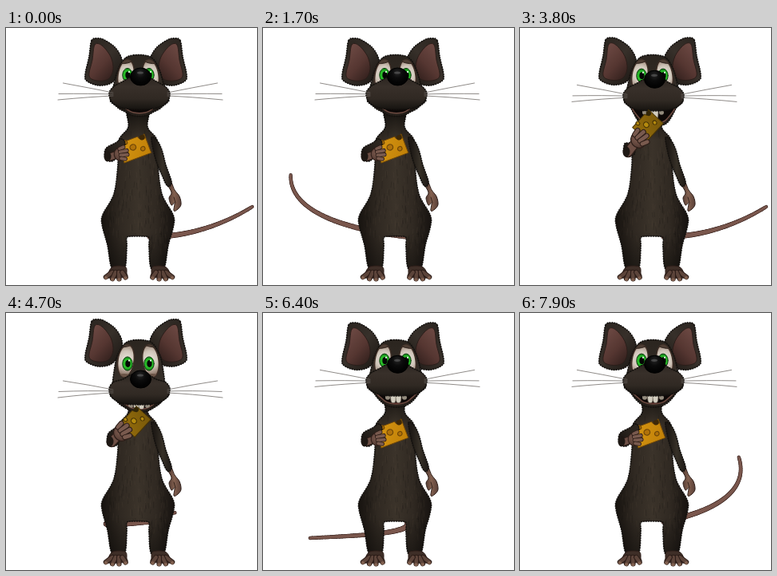
Animation of 314x322 px, one loop 8000 ms. Source, as an HTML page with a canvas:

```html
<!DOCTYPE html>
<html lang="en">
<head>
<meta charset="utf-8">
<title>Mouse with cheese</title>
<style>
html, body { margin: 0; width: 100%; height: 100%; overflow: hidden; background: #fff; }
canvas { display: block; width: 314px; height: 322px; }
</style>
</head>
<body>
<canvas id="stage" width="314" height="322"></canvas>
<script>
const ctx = document.getElementById('stage').getContext('2d');
const LOOP = 8000, STEP = 100;
const EDGE = '#14110e', SKIN = '#6d4f45', SKIN_DARK = '#2c1d18';

const mix = (a, b, u) => a + (b - a) * u;

// eased 0 to 1 between two times
function ease(t, from, to) {
  const u = Math.min(1, Math.max(0, (t - from) / (to - from)));
  return u * u * (3 - 2 * u);
}

// closed smooth path through flat x, y pairs
function blob(p) {
  const n = p.length / 2, X = i => p[(i + n) % n * 2], Y = i => p[(i + n) % n * 2 + 1];
  const path = new Path2D();
  path.moveTo(p[0], p[1]);
  for (let i = 0; i < n; i++) path.bezierCurveTo(
    X(i) + (X(i + 1) - X(i - 1)) / 6, Y(i) + (Y(i + 1) - Y(i - 1)) / 6,
    X(i + 1) - (X(i + 2) - X(i)) / 6, Y(i + 1) - (Y(i + 2) - Y(i)) / 6, X(i + 1), Y(i + 1));
  path.closePath();
  return path;
}

// blob from its left half, mirrored about a vertical axis
function twin(axis, half) {
  const p = [...half];
  for (let i = half.length - 2; i >= 0; i -= 2) p.push(2 * axis - half[i], half[i + 1]);
  return blob(p);
}

function oval(x, y, rx, ry, turn = 0) {
  const path = new Path2D();
  path.ellipse(x, y, rx, ry, turn, 0, Math.PI * 2);
  return path;
}

function stroke(path, color, width) {
  ctx.strokeStyle = color;
  ctx.lineWidth = width;
  ctx.stroke(path);
}

function paint(path, fill, edge, width = 1) {
  ctx.fillStyle = fill;
  ctx.fill(path);
  if (edge) stroke(path, edge, width);
}

function line(x1, y1, x2, y2, color, width) {
  const path = new Path2D();
  path.moveTo(x1, y1);
  path.lineTo(x2, y2);
  stroke(path, color, width);
}

function shades(g, colors) {
  colors.forEach((c, i) => g.addColorStop(i / (colors.length - 1), c));
  return g;
}
const ramp = (x1, y1, x2, y2, ...colors) => shades(ctx.createLinearGradient(x1, y1, x2, y2), colors);
const glow = (x, y, r, ...colors) => shades(ctx.createRadialGradient(x, y, 0, x, y, r), colors);

// fur silhouette with a slightly serrated rim
function fur(path, fill) {
  paint(path, fill, EDGE, 0.8);
  ctx.lineCap = 'butt';
  ctx.setLineDash([1.4, 1.6]);
  stroke(path, EDGE, 1.8);
  ctx.setLineDash([]);
  ctx.lineCap = 'round';
}

function mirrored(axis, draw) {
  for (const side of [1, -1]) {
    ctx.save();
    if (side < 0) { ctx.translate(axis * 2, 0); ctx.scale(-1, 1); }
    draw();
    ctx.restore();
  }
}

const BODY = twin(165, [152, 100, 153, 124, 141, 141, 140, 172, 135, 208, 121, 234,
  120.5, 248, 127, 272, 133, 302, 148, 302, 151, 275, 151, 263, 157, 261]);
const EAR = blob([107, 16, 114, 13, 123, 15, 137, 25, 145, 40, 143, 54, 133, 68, 117, 72, 102, 67, 99, 59, 104, 36]);
const EAR_IN = blob([111, 21, 120, 22, 131, 36, 134, 52, 128, 64, 114, 66, 104, 60, 108, 40]);
const SLEEVE = blob([182, 138, 189, 141, 195, 153, 200, 172, 207, 193, 202, 198, 195, 184, 187, 164]);
const HAND = blob([201, 194, 206, 192, 211, 203, 217, 211, 219, 221, 215, 227,
  210, 229, 211, 219, 207, 222, 204, 213, 207, 206]);

// swing phases: share of one half swing, sideways reach, height of the tail tip
const SWING = [[0, 150, 224], [0.24, 99, 282], [0.44, 53, 250], [0.59, -43, 209], [0.9, -118, 181], [1, -150, 224]];
const TURNS = [0, 1850, 3800, 5850, 8150];

function tailTip(u, side) {
  if (u >= 1) { u -= 1; side = -side; }
  const n = SWING.length, i = SWING.findIndex((k, j) => j === n - 2 || u < SWING[j + 1][0]);
  const [a, b, c, d] = [-1, 0, 1, 2].map(o => SWING[Math.min(n - 1, Math.max(0, i + o))]);
  const w = (u - b[0]) / (c[0] - b[0]);
  const value = k => {
    const m1 = (c[k] - a[k]) / (c[0] - a[0]), m2 = (d[k] - b[k]) / (d[0] - b[0]);
    return mix(b[k], c[k], w * w * (3 - 2 * w))
      + (c[0] - b[0]) * (m1 * w * (1 - w) ** 2 - m2 * w * w * (1 - w));
  };
  return [158 + side * value(1), value(2)];
}

// the root of the tail leads the swing and the tip trails behind
function drawTail(t) {
  const h = TURNS.findIndex((s, i) => t < TURNS[i + 1]);
  const u = (t - TURNS[h]) / (TURNS[h + 1] - TURNS[h]), side = h % 2 ? -1 : 1;
  const rx = 180, ry = 261;
  const [x3, y3] = tailTip(u, side);
  const x1 = mix(rx, tailTip(u + 0.35, side)[0], 0.65), x2 = tailTip(u + 0.2, side)[0];
  const y2 = mix(y3, ry, 0.5) + 8, y1 = mix(y2, ry, 0.5) + 7;
  const bez = (s, a, b, c, d) => {
    const v = 1 - s;
    return a * v ** 3 + 3 * b * s * v * v + 3 * c * s * s * v + d * s ** 3;
  };
  const N = 48;
  for (const [color, extra] of [['#3a241f', 1.4], ['#7a574d', 0]]) {
    let px = rx, py = ry;
    for (let i = 1; i <= N; i++) {
      const s = i / N, x = bez(s, rx, x1, x2, x3), y = bez(s, ry, y1, y2, y3);
      line(px, py, x, y, color, 6 - 3 * s + extra);
      px = x; py = y;
    }
  }
}

function drawBody() {
  fur(BODY, ramp(121, 0, 210, 0, '#181410', '#302922', '#3b332a', '#302922', '#171310'));
  ctx.save();
  ctx.clip(BODY);
  let seed = 7;
  const rnd = () => (seed = seed * 16807 % 2147483647) / 2147483647;
  for (let i = 0; i < 240; i++) {
    const x = 126 + rnd() * 78, y = 128 + rnd() * 150;
    line(x, y, x + rnd() * 2 - 1, y + 4 + rnd() * 5,
      rnd() < 0.5 ? 'rgba(104,91,73,.16)' : 'rgba(12,9,7,.2)', 0.8);
  }
  ctx.fillStyle = ramp(0, 102, 0, 140, 'rgba(0,0,0,.65)', 'rgba(0,0,0,0)');
  ctx.fillRect(135, 98, 60, 44);
  ctx.fillStyle = ramp(0, 255, 0, 302, 'rgba(0,0,0,0)', 'rgba(0,0,0,.4)');
  ctx.fillRect(115, 255, 105, 50);
  ctx.restore();
  mirrored(166.5, () => {
    paint(blob([134, 299, 149, 299, 151, 307, 150, 312, 128, 313, 128, 307]), '#3e2e27', SKIN_DARK, 1);
    for (let i = 0; i < 4; i++) {
      const x = 125 + i * 8.2, y = 312 + 2.5 * Math.sin(i);
      line(mix(x, 141, 0.5), 306, x, y, SKIN_DARK, 6.4);
      line(mix(x, 141, 0.5), 306, x, y, '#5c443a', 4.4);
      paint(oval(x, y + 1, 2.2, 2), '#80604f');
    }
  });
  paint(HAND, ramp(202, 0, 219, 0, '#4c352e', '#82604f', '#5a4038'), SKIN_DARK, 1);
  fur(SLEEVE, ramp(186, 0, 206, 0, '#1f1a16', '#363027', '#211c18'));
  line(210, 212, 212, 219, SKIN_DARK, 0.9);
}

function drawEars(p) {
  mirrored(162.5, () => {
    ctx.translate(0, -5 * p);
    fur(EAR, ramp(100, 20, 146, 60, '#2b2520', '#37302a', '#1f1a16'));
    paint(EAR_IN, ramp(106, 30, 138, 60, '#6a4741', '#553631', '#2f1e1b'), '#2a1d19', 1);
  });
}

function drawMouth(p, m) {
  const d = 12 * p, low = 108 + d + 11 * m, cx = 167;
  fur(twin(cx, [134, 88 + d, 139, 99 + d, 149, low - 3, 160, low + 2]),
    ramp(0, 95 + d, 0, low + 3, '#15110e', '#2a231d'));
  const inside = twin(cx, [142, 93 + d, 150, low - 7, 160, low - 2]);
  paint(inside, '#0d0807', '#6d4a40', 1.5);
  if (m < 0.05) return;
  ctx.save();
  ctx.clip(inside);
  paint(oval(cx, low, 12, 2 + 2 * m), '#5c332d');
  const top = 99 + d, h = 8 + 5 * m;
  for (const x of [160, 166.5])
    paint(blob([x, top, x + 6, top, x + 5.5, top + h, x + 0.5, top + h]), '#d2cdbf', '#6d6458', 0.7);
  for (const x of [156, 177]) paint(oval(x, top + 5, 3, 3), '#948c7e');
  ctx.restore();
}

function drawEyes(p) {
  mirrored(165.5, () => {
    const white = oval(150, 60, 10, 20.5, 0.14);
    paint(white, glow(151, 58, 21, '#e9e4da', '#cfc4b8', '#82695b'), '#3d2d25', 1.4);
    ctx.save();
    ctx.clip(white);
    paint(oval(151, 37, 14, 7 - 2 * p, -0.25), '#4d3d33', '#2c211b', 1);
    paint(oval(148, 82, 13, 6), '#6a5447');
    ctx.restore();
  });
  const y = 59 + 4.5 * p;
  for (const x of [152, 179]) {
    paint(oval(x, y, 6.2, 8.6), glow(x, y, 9, '#0a500c', '#2bc52a', '#117416'), '#0b3a0d', 1);
    paint(oval(x + 0.5, y, 3, 4.4), '#050705');
    paint(oval(x + 2, y - 4, 1, 1.2), '#e8ffe8');
  }
}

function drawFace(p) {
  const d = 13 * p, top = 16 * p;
  fur(twin(166, [160, 34, 150, 37, 143, 46, 137, 62, 134, 86 + d, 150, 96 + d]),
    ramp(0, 34, 0, 95, '#2b251f', '#37302a'));
  drawEyes(p);
  const muzzle = twin(167, [158, 61 + top, 146, 67 + top, 134, 74 + d, 129, 83 + d, 134, 94 + d, 150, 101 + d]);
  fur(muzzle, ramp(0, 58 + top, 0, 104 + d, '#28221d', '#38302a', '#302923', '#12100d'));
  const ny = 61 + 22 * p;
  paint(oval(168.5, ny, 13, 11), glow(168, ny - 5, 13, '#262626', '#0c0c0c', '#030303'), '#000', 1);
  paint(oval(168, ny - 5, 4, 1.6), 'rgba(120,120,120,.45)');
}

function drawWhiskers(p) {
  mirrored(168, () => {
    for (const [x, y, root] of [[71.5, 69, 81], [66, 82.5, 83], [65, 90, 85]]) {
      const w = new Path2D();
      w.moveTo(134, root + 15 * p);
      w.quadraticCurveTo(105, mix(root, y, 0.42) - 0.8 + 15 * p, x, y + 16 * p);
      stroke(w, '#6a6561', 0.75);
    }
  });
}

function drawCheese(x, y, turn, bite) {
  ctx.save();
  ctx.translate(x, y);
  ctx.rotate(turn);
  ctx.scale(1 - 0.17 * bite, 1);
  const slab = new Path2D('M-18 -12.5L9 -12.5Q10 -8 14 -8Q18 -9 17 -12.5L18 -12.5L18 12.5L-18 12.5Z');
  const tone = (a, b) => `rgb(${a.map((v, i) => Math.round(mix(v, b[i], bite)))})`;
  const rim = tone([112, 72, 8], [72, 52, 6]);
  paint(slab, ramp(-18, -12, 18, 12, tone([214, 150, 18], [150, 110, 12]), tone([192, 128, 8], [120, 88, 10])), rim, 1);
  for (const [hx, hy, r] of [[-1, -2, 3.8], [10, 4, 2.8], [-8, -11, 2.6]])
    paint(oval(hx, hy, r, r * 0.95), tone([176, 114, 10], [180, 138, 14]), rim, 1.2);
  paint(oval(14, -9.5, 3.6, 3.2), tone([62, 40, 8], [50, 38, 8]));
  ctx.restore();
}

// up: cheese held at the mouth, lift: extra height while the head is still raised
function drawArm(up, lift) {
  const ex = 128 + 3 * up + 3 * lift, ey = 160 - 6 * lift;
  const hx = 143 + up + 4 * lift, hy = 157 - 8 * up - 10 * lift;
  drawCheese(160.5 + 1.5 * up - 2 * lift, 151 - 15 * up - 14 * lift, -0.36 - 0.47 * up, up);
  const upper = blob([145, 139, 137, 144, ex - 3, ey - 9, ex - 4, ey + 2, ex + 2, ey + 7, ex + 9, ey + 4, 144, 152, 149, 145]);
  fur(upper, ramp(ex - 5, ey, 150, 142, '#1a1512', '#28221c', '#302922'));
  const size = 1 + 0.25 * up;
  line(ex + 1, ey + 2, hx, hy, SKIN_DARK, 10 * size);
  line(ex + 1, ey + 2, hx, hy, SKIN, 8 * size);
  paint(oval(ex - 1, ey + 1, 4.5, 6.5), '#1e1814');
  ctx.save();
  ctx.translate(hx, hy);
  ctx.rotate(Math.atan2(hy - ey, hx - ex) * 0.85);
  ctx.scale(size, size);
  paint(oval(-1, 1, 7, 8), glow(-1, -1, 9, '#7d5b4f', '#553c34'), SKIN_DARK, 1);
  for (let i = 0; i < 4; i++) {
    const y = -7 + 5 * i, x = 5 + 4 * Math.sin(i * Math.PI / 3);
    line(0, y * 0.8, x, y, SKIN_DARK, 5.4);
    line(0, y * 0.8, x, y, '#795a4e', 3.8);
  }
  ctx.restore();
}

function frame(now) {
  const t = Math.floor(now % LOOP / STEP) * STEP;
  const nod = ease(t, 3800, 4500) - ease(t, 4900, 5400);
  const pitch = 0.15 * ease(t, 3000, 3800) + 0.85 * nod;
  const mouth = 0.75 * ease(t, 1900, 3000) + 0.25 * ease(t, 3200, 3800)
    - 0.85 * ease(t, 3800, 4600) + 0.35 * ease(t, 4900, 5400);
  const up = ease(t, 3100, 3800) - ease(t, 5000, 5600);
  ctx.fillStyle = '#fff';
  ctx.fillRect(0, 0, 314, 322);
  ctx.lineCap = ctx.lineJoin = 'round';
  drawTail(t);
  drawEars(pitch);
  drawBody();
  drawMouth(pitch, mouth);
  drawFace(pitch);
  drawWhiskers(pitch);
  drawArm(up, up * (1 - nod));
}

const start = performance.now();
function tick() {
  frame(performance.now() - start);
  requestAnimationFrame(tick);
}
tick();
</script>
</body>
</html>
```
